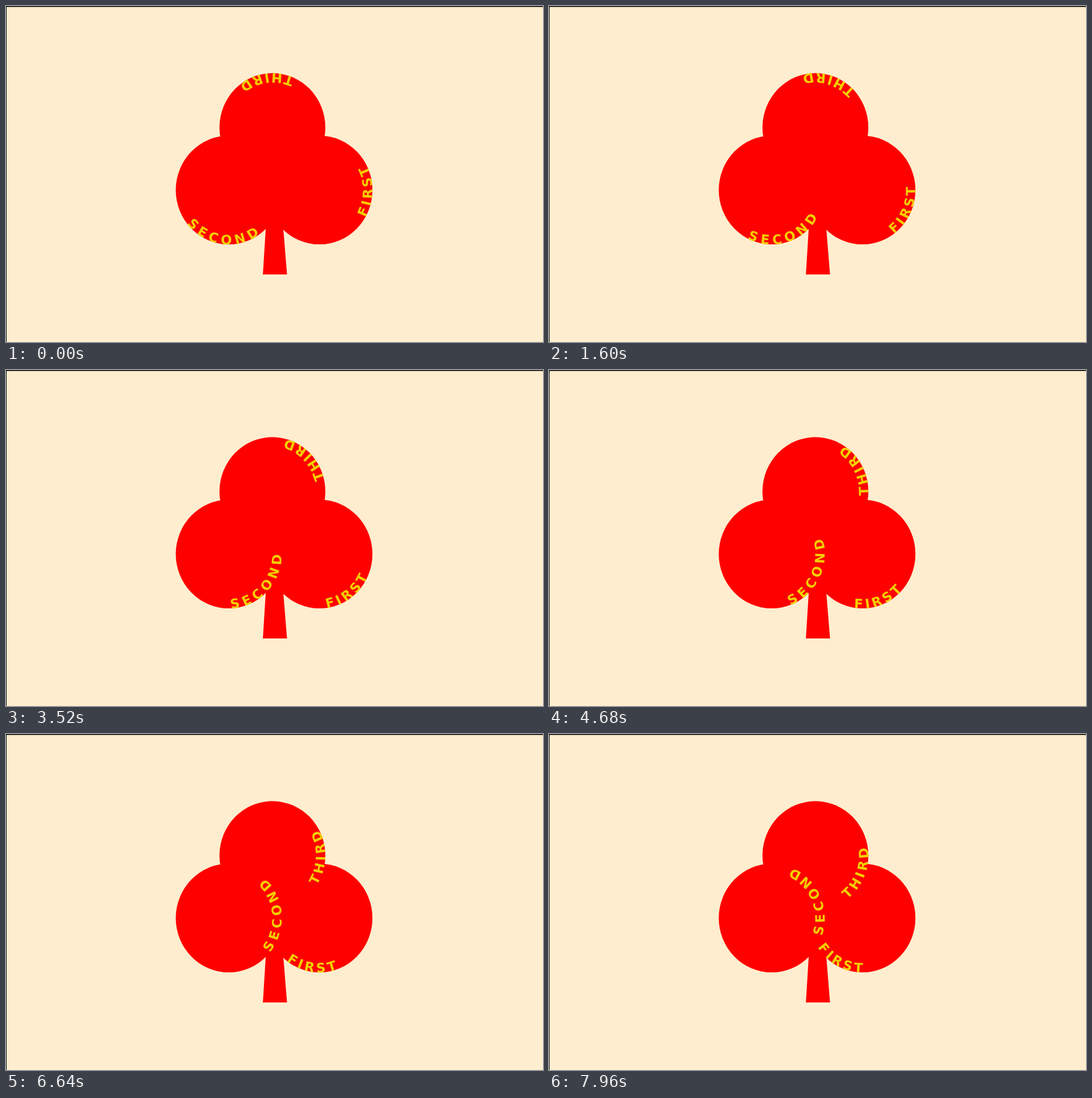
Animation, 947 px wide and 592 px high, one loop 8000 ms. Source, as an HTML page:

```html
<!DOCTYPE html>
<html lang="en">
<head>
<meta charset="utf-8">
<title>Club with circling words</title>
<style>
  html, body { margin: 0; width: 100%; height: 100%; overflow: hidden; background: #ffedcf; }
  svg { display: block; width: 947px; height: 592px; }
  text { font: bold 23px "DejaVu Sans", sans-serif; fill: #f2d000; font-kerning: none; }
</style>
</head>
<body>
<svg viewBox="0 0 947 592">
  <rect width="947" height="592" fill="#ffedcf"/>
  <rect width="947" height="1.6"/>
  <rect width="1" height="592"/>
  <g id="club" fill="#f00">
    <path d="M461.3 340 L453 473 H495.6 L484.7 340 Z"/>
  </g>
  <g id="words"></g>
</svg>
<script>
const LOOP = 8000, RX = 93.4, RY = 95.8;

// start: offset along the leaf outline in px, speed: px per second
const leaves = [
  { word: 'FIRST',  cx: 552.8, cy: 324.3, start: 246.5, speed: -24.2,  gap: 5.1 },
  { word: 'SECOND', cx: 392.8, cy: 324.3, start: 63.5,  speed: 25.3,   gap: 7.2 },
  { word: 'THIRD',  cx: 469.8, cy: 214.1, start: 405.7, speed: -24.75, gap: 5.5 },
];

function add(parent, tag, attrs) {
  const el = document.createElementNS('http://www.w3.org/2000/svg', tag);
  for (const key in attrs) el.setAttribute(key, attrs[key]);
  return parent.appendChild(el);
}

const club = document.getElementById('club');
const words = document.getElementById('words');

for (const leaf of leaves) {
  const { word, cx, cy, gap } = leaf;
  const arc = x => `A${RX} ${RY} 0 0 0 ${x} ${cy}`;
  const id = 'leaf-' + word.toLowerCase();
  add(club, 'path', { id, d: `M${cx - RX} ${cy} ${arc(cx + RX)} ${arc(cx - RX)}` });
  const text = add(words, 'text', { 'letter-spacing': gap });
  leaf.label = add(text, 'textPath', { href: '#' + id });
  leaf.label.textContent = word;
}

function draw(ms) {
  for (const { label, start, speed } of leaves)
    label.setAttribute('startOffset', start + speed * ms / 1000);
}

const begin = performance.now();
function tick() {
  draw((performance.now() - begin) % LOOP);
  requestAnimationFrame(tick);
}
tick();
</script>
</body>
</html>
```
